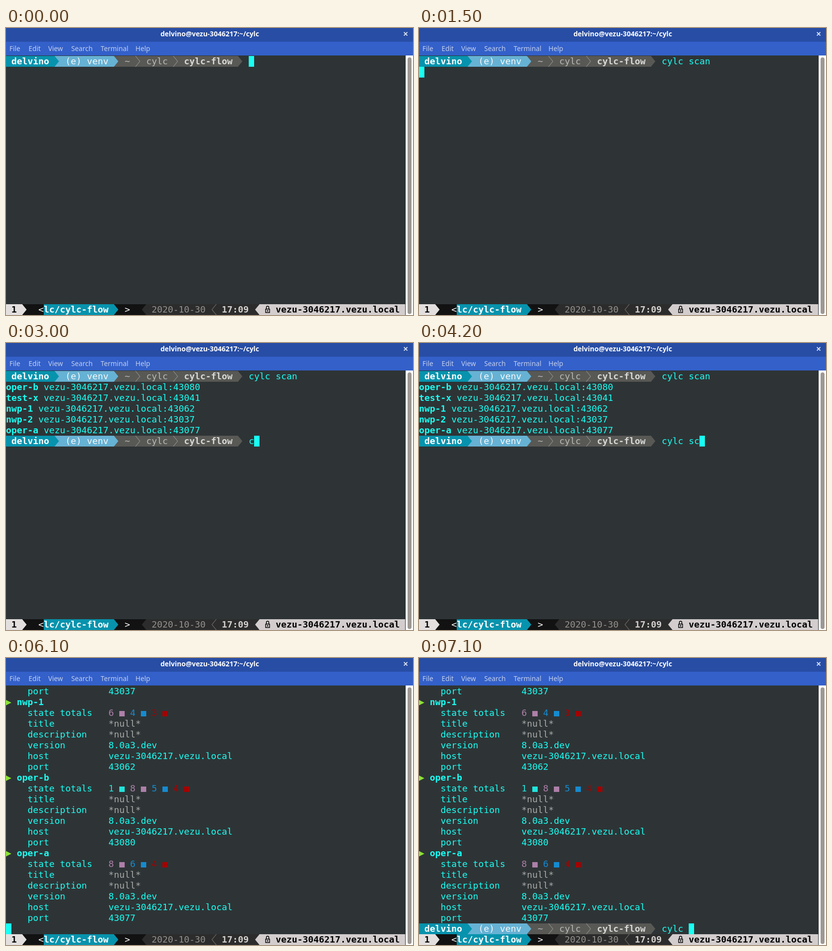
Write an HTML page with a canvas that moves like this. It is 830x585 px and loops after 8 s.

```html
<!DOCTYPE html>
<html lang="en">
<head>
<meta charset="utf-8">
<title>Terminal</title>
<style>
html, body { margin: 0; width: 100%; height: 100%; overflow: hidden; background: #2e3436; }
canvas { display: block; width: 830px; height: 585px; }
</style>
</head>
<body>
<canvas id="stage" width="830" height="585"></canvas>
<script>
const ctx = document.getElementById('stage').getContext('2d');
const LOOP = 8000;
const CW = 11, RH = 22, TOP = 57, TIP = 9;
const USER = 'delvino', NODE = 'vezu-3046217', HOST = NODE + '.vezu.local';
const MONO = '18.27px "DejaVu Sans Mono", monospace';
const SANS = '"Noto Sans", "Open Sans", sans-serif';
const BG = '#2e3436', CYAN = '#1afff3', TEAL = '#0793ad', SKY = '#66b2d4', GREY = '#585855';
const DARK = '#121212', MID = '#2c2c2c', PALE = '#e3dfdf', PINK = '#d3cdce';
const PURPLE = '#ad7fa8', BLUE = '#158bd0', RED = '#a40000', AQUA = '#22e4dc';

const flows = [
  ['oper-b', 43080], ['test-x', 43041], ['nwp-1', 43062], ['nwp-2', 43037], ['oper-a', 43077]
];
const details = [
  ['nwp-1', 43062, [[6, PURPLE], [4, BLUE], [3, RED]]],
  ['oper-b', 43080, [[1, AQUA], [8, PURPLE], [5, BLUE], [4, RED]]],
  ['oper-a', 43077, [[8, PURPLE], [6, BLUE], [4, RED]]]
];

// [time, command so far]; null means the command is running
const firstTyping = [
  [0, ''], [700, 'c'], [800, 'cyl'], [900, 'cylc '], [1100, 'cylc s'], [1200, 'cylc sc'],
  [1300, 'cylc sca'], [1400, 'cylc scan'], [1500, null]
];
const secondTyping = [
  [2300, ''], [3000, 'c'], [3100, 'cy'], [3200, 'cylc'], [3300, 'cylc '], [4200, 'cylc sc'],
  [4300, 'cylc sca'], [4400, 'cylc scan'], [4500, 'cylc scan '], [4600, 'cylc scan -'],
  [4800, 'cylc scan -t '], [5000, 'cylc scan -t ri'], [5100, 'cylc scan -t ric'],
  [5300, 'cylc scan -t rich'], [5500, null]
];
const thirdTyping = [[6300, ''], [6800, 'c'], [6900, 'cy'], [7000, 'cylc'], [7100, 'cylc ']];

const rowY = row => TOP + row * RH;

function box(x, y, w, h, color) {
  ctx.fillStyle = color;
  ctx.fillRect(x, y, w, h);
}

function cells(col, row, n, color) {
  box(col * CW, rowY(row), n * CW, RH, color);
}

function text(str, col, row, color, bold) {
  ctx.font = (bold ? 'bold ' : '') + MONO;
  ctx.fillStyle = color;
  ctx.fillText(str, col * CW, rowY(row) + 17);
}

function label(str, x, y, color, font) {
  ctx.font = font;
  ctx.fillStyle = color;
  ctx.fillText(str, x, y);
}

// Separator outline; dir 1 points right, -1 points left
function arrowPath(col, row, dir) {
  const x = (dir > 0 ? col : col + 1) * CW, y = rowY(row);
  ctx.beginPath();
  ctx.moveTo(x, y);
  ctx.lineTo(x + dir * TIP, y + RH / 2);
  ctx.lineTo(x, y + RH);
}

function wedge(col, row, color, dir = 1) {
  arrowPath(col, row, dir);
  ctx.fillStyle = color;
  ctx.fill();
}

function chevron(col, row, color, dir = 1) {
  arrowPath(col, row, dir);
  ctx.strokeStyle = color;
  ctx.lineWidth = 1.1;
  ctx.stroke();
}

function cursor(col, row) {
  cells(col, row, 1, CYAN);
}

function prompt(row, command) {
  cells(0, row, 9, TEAL);
  cells(9, row, 11, SKY);
  wedge(9, row, TEAL);
  cells(20, row, 23, GREY);
  wedge(20, row, SKY);
  wedge(43, row, GREY);
  text(USER, 1, row, '#ffffff', true);
  text('(e) venv', 11, row, '#f4f8fa');
  text('~', 22, row, '#b8b8b6');
  chevron(24, row, '#94948f');
  text('cylc', 26, row, '#b8b8b6');
  chevron(31, row, '#94948f');
  text('cylc-flow', 33, row, '#d8d8d6', true);
  text(command, 45, row, CYAN);
}

function typedAt(steps, t) {
  let now = null;
  for (const [at, str] of steps) if (t >= at) now = str;
  return now;
}

function livePrompt(row, steps, t) {
  const str = typedAt(steps, t);
  if (str === null) {
    prompt(row, steps[steps.length - 2][1]);
    cursor(0, row + 1);
  } else {
    prompt(row, str);
    cursor(45 + str.length, row);
  }
}

function flowList() {
  flows.forEach(([name, port], i) => {
    text(name, 0, i + 1, CYAN, true);
    text(HOST + ':' + port, name.length + 1, i + 1, CYAN);
  });
}

function field(row, name, value, color = CYAN) {
  text(name, 4, row, CYAN);
  text(value, 19, row, color);
}

function flowDetail(row, name, port, totals) {
  const y = rowY(row);
  ctx.fillStyle = '#8ae234';
  ctx.beginPath();
  ctx.moveTo(0, y + 6.5);
  ctx.lineTo(11, y + 12);
  ctx.lineTo(0, y + 17.5);
  ctx.fill();
  text(name, 2, row, CYAN, true);
  field(row + 1, 'state totals', '');
  totals.forEach(([n, color], i) => {
    const col = 19 + i * 4;
    text(String(n), col, row + 1, color);
    box((col + 2) * CW, rowY(row + 1) + 7, 11, 11, color);
  });
  field(row + 2, 'title', '*null*', '#a9a9a7');
  field(row + 3, 'description', '*null*', '#a9a9a7');
  field(row + 4, 'version', '8.0a3.dev');
  field(row + 5, 'host', HOST);
  field(row + 6, 'port', String(port));
}

function windowFrame() {
  box(0, 0, 830, 28, '#274da5');
  box(0, 28, 830, 28, '#3360c9');
  ctx.textAlign = 'center';
  label(USER + '@' + NODE + ':~/cylc', 415.5, 17, '#ffffff', 'bold 14px ' + SANS);
  ctx.textAlign = 'left';
  const menu = [['File', 7], ['Edit', 46], ['View', 86], ['Search', 133], ['Terminal', 193], ['Help', 264]];
  for (const [name, x] of menu) label(name, x, 47, '#c3cfee', '13.8px ' + SANS);
  ctx.strokeStyle = '#d5def2';
  ctx.lineWidth = 1.8;
  ctx.beginPath();
  ctx.moveTo(811.5, 8.5); ctx.lineTo(818.5, 15.5);
  ctx.moveTo(818.5, 8.5); ctx.lineTo(811.5, 15.5);
  ctx.stroke();
  box(815, 56, 15, 529, '#ffffff');
  ctx.fillStyle = '#9d9893';
  ctx.beginPath();
  ctx.roundRect(819, 60, 8, 523, 4);
  ctx.fill();
}

function lock(x, y) {
  ctx.strokeStyle = '#000000';
  ctx.lineWidth = 1.5;
  ctx.strokeRect(x + 1.5, y + 10, 8, 7);
  ctx.beginPath();
  ctx.moveTo(x + 3, y + 10);
  ctx.lineTo(x + 3, y + 6.5);
  ctx.arc(x + 5.5, y + 6.5, 2.5, Math.PI, 0);
  ctx.lineTo(x + 8, y + 10);
  ctx.stroke();
  box(x + 4.5, y + 12, 2, 3, '#000000');
}

function statusBar() {
  const r = 23;
  cells(0, r, 3, PALE);
  cells(3, r, 23, DARK);
  wedge(3, r, PALE);
  text('1', 1, r, '#000000', true);
  text('<', 6, r, '#ffffff');
  cells(7, r, 13, TEAL);
  wedge(20, r, TEAL);
  text('lc/cylc-flow', 7, r, '#ffffff', true);
  text('>', 22, r, '#ffffff');
  wedge(25, r, MID, -1);
  cells(26, r, 21, MID);
  text('2020-10-30', 27, r, '#94928f');
  chevron(38, r, '#77746f', -1);
  text('17:09', 40, r, '#d4d0ce', true);
  wedge(46, r, PINK, -1);
  cells(47, r, 27, PINK);
  lock(528, rowY(r));
  text(HOST, 50, r, '#000000', true);
}

function draw(t) {
  box(0, 0, 830, 585, BG);
  windowFrame();
  if (t < 2200) {
    livePrompt(0, firstTyping, t);
  } else if (t < 6100) {
    prompt(0, 'cylc scan');
    flowList();
    if (t < 2300) cursor(0, 6);
    else livePrompt(6, secondTyping, t);
  } else {
    field(0, 'port', '43037');
    details.forEach((d, i) => flowDetail(1 + i * 7, ...d));
    if (t < 6300) cursor(0, 22);
    else livePrompt(22, thirdTyping, t);
  }
  statusBar();
}

const start = performance.now();
function tick() {
  draw((performance.now() - start) % LOOP);
  requestAnimationFrame(tick);
}
tick();
</script>
</body>
</html>
```
